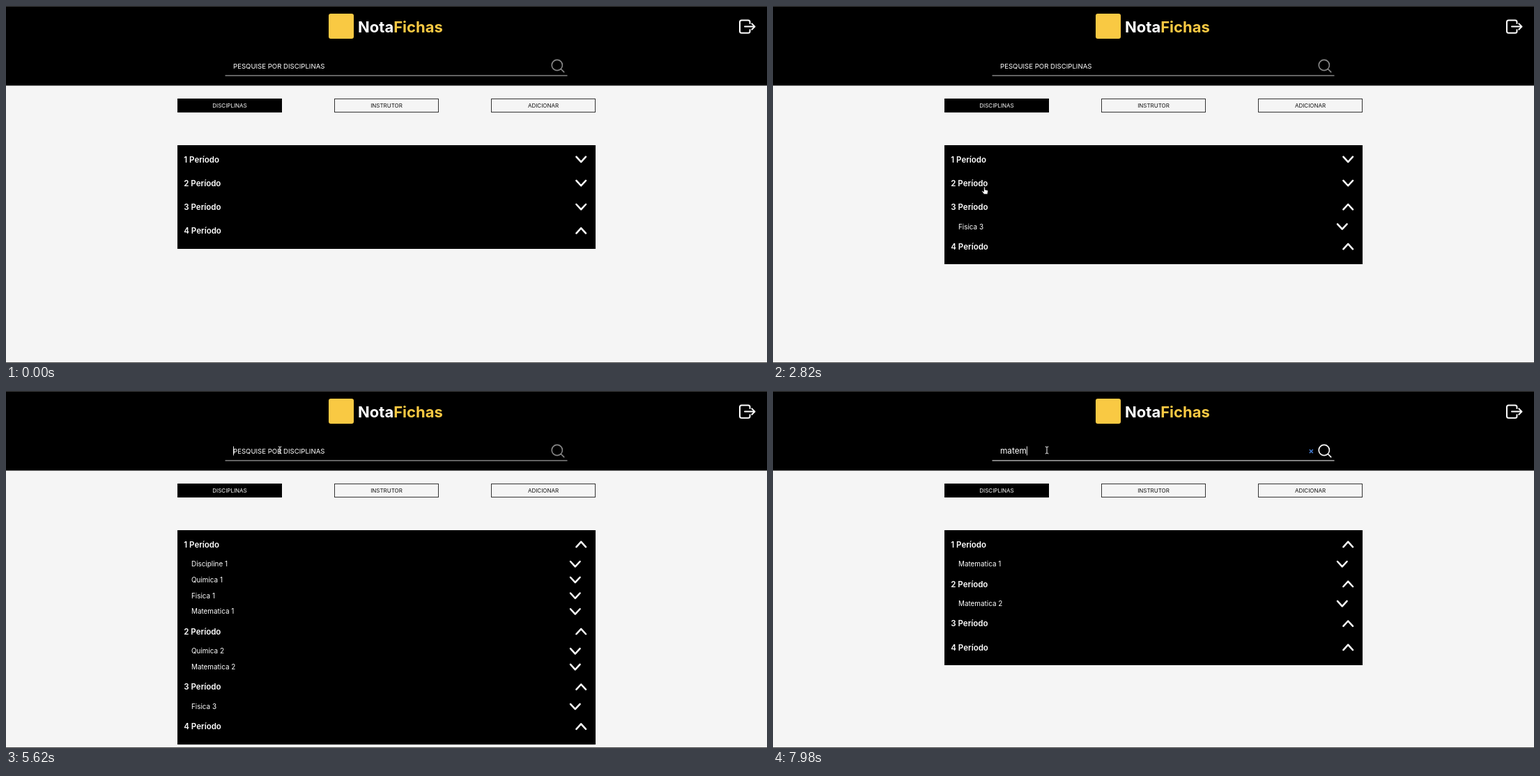
An HTML page that plays this animation: 1092x513 px, repeating every 8 s.

```html
<!DOCTYPE html>
<html lang="pt">
<head>
<meta charset="utf-8">
<title>NotaFichas</title>
<style>
html, body { margin: 0; width: 100%; height: 100%; overflow: hidden; background: #f5f5f5; }
svg { display: block; width: 100vw; height: 100vh; font-family: Inter, "Open Sans", sans-serif; fill: #fff; }
.brand { font-size: 22px; font-weight: 700; }
.tab { font-size: 8px; text-anchor: middle; }
.hint { font-size: 9.6px; }
.typed { font-size: 11.8px; }
.period { font-size: 11.5px; font-weight: 600; }
.item { font-size: 9.9px; }
.line { fill: none; stroke: #fff; stroke-width: 2; stroke-linecap: round; stroke-linejoin: round; }
.chevron { stroke-width: 2.5; }
.cursor { stroke: #000; stroke-width: .7; stroke-linejoin: round; }
</style>
</head>
<body>
<svg id="stage" viewBox="0 0 1092 513" preserveAspectRatio="none">
  <rect width="1092" height="513" fill="#f5f5f5"/>
  <rect width="1092" height="114.4" fill="#000"/>
  <rect width="1092" height="1" fill="#383838"/>
  <rect y="512" width="1092" height="1" fill="#4a4a4a"/>

  <rect x="463" y="11" width="36" height="36" rx="3" fill="#f9c943"/>
  <text class="brand" x="505" y="38">Nota<tspan fill="#f9c943">Fichas</tspan></text>

  <g class="line">
    <path d="M1067.5 25V23a2.5 2.5 0 0 0-2.5-2.5h-9.5a2.5 2.5 0 0 0-2.5 2.5v13.3a2.5 2.5 0 0 0 2.5 2.5h9.5a2.5 2.5 0 0 0 2.5-2.5v-2"/>
    <path d="M1060 29.6h14.3M1070.3 25.4l4.2 4.2-4.2 4.2"/>
  </g>

  <rect id="rule" x="314.5" y="99.5" width="491" height="1"/>
  <text class="hint" id="hint" x="326" y="89.6">PESQUISE POR DISCIPLINAS</text>
  <text class="typed" id="typed" x="326" y="90.2"></text>
  <rect id="caret" y="79.5" width=".9" height="13"/>
  <path id="clear" d="M769.8 84.1l5 5m0-5l-5 5" fill="none" stroke="#3f74c4" stroke-width="1.5"/>
  <path id="lens" class="line" style="stroke-width:1.6" d="M783.2 85a7.6 7.6 0 1 0 15.2 0a7.6 7.6 0 1 0-15.2 0M796.3 90.5l4.4 4.4"/>

  <g id="tabs"></g>
  <g id="panel"></g>

  <g id="pointer">
    <path class="cursor" id="arrow" d="M0 0v10.2l2.4-2.2 1.6 3.6 1.6-.7-1.6-3.5h3.2z"/>
    <path class="cursor" id="hand" d="M-1 .8q.9-1.4 1.8 0v3.2l3.3.8q1 .3.9 1.4l-.7 4.2h-5l-3-3.8q-.3-1.2.9-.9l1.8 1.1z"/>
    <path id="beam" fill="none" stroke="#fff" stroke-width="1" d="M-2.3-5q2 0 2.3 1q.3-1 2.3-1M0-4v8M-2.3 5q2 0 2.3-1q.3 1 2.3 1"/>
  </g>
</svg>
<script>
const LOOP = 8000;
const NS = "http://www.w3.org/2000/svg";
const $ = id => document.getElementById(id);

const periods = [
  ["Discipline 1", "Quimica 1", "Fisica 1", "Matematica 1"],
  ["Quimica 2", "Matematica 2"],
  ["Fisica 3"],
  []
];
// Moment each period is opened, and each key is pressed
const openAt = [3740, 3360, 2520, 0];
const focusAt = 5120;
const keys = [[6700, "m"], [6820, "ma"], [7140, "mat"], [7440, "mate"], [7740, "matem"]];
// time, x, y of the pointer tip
const path = [
  [640, -12, 340], [840, 16, 336], [1200, 190, 324], [1560, 320, 316],
  [2080, 320, 316], [2420, 311, 287], [2560, 311, 287], [2820, 303.5, 260],
  [3000, 303, 256], [3400, 303, 256], [3640, 307, 219], [3800, 307, 219],
  [4060, 316, 194], [4240, 318, 190], [4860, 393, 85], [LOOP, 393, 85]
];

function add(parent, tag, attrs, text) {
  const el = document.createElementNS(NS, tag);
  for (const name in attrs) el.setAttribute(name, attrs[name]);
  if (text) el.textContent = text;
  parent.append(el);
}

function chevron(x, y, up) {
  const h = up ? -3.7 : 3.7;
  add($("panel"), "path", { class: "line chevron", d: `M${x - 6.8} ${y - h}L${x} ${y + h}L${x + 6.8} ${y - h}` });
}

function drawTabs() {
  ["DISCIPLINAS", "INSTRUTOR", "ADICIONAR"].forEach((label, i) => {
    const x = 246 + 225 * i;
    add($("tabs"), "rect", { x: x + .5, y: 133.5, width: 149, height: 19, fill: i ? "#f5f5f5" : "#000", stroke: i ? "#333" : "#000" });
    add($("tabs"), "text", { class: "tab", x: x + 75, y: 146, fill: i ? "#111" : "#fff" }, label);
  });
}

function drawPanel(open, query) {
  const panel = $("panel");
  const lists = periods.map((list, i) =>
    open[i] ? list.filter(name => name.toLowerCase().includes(query)) : []);
  const count = lists.flat().length;
  panel.textContent = "";
  add(panel, "rect", { x: 246, y: 200, width: 600, height: Math.round(148.6 + 22.75 * count), fill: "#000" });
  let y = 220.4;
  lists.forEach((list, i) => {
    add(panel, "text", { class: "period", x: 255.3, y: y + 4.2 }, `${i + 1} Período`);
    chevron(825.2, y, open[i]);
    list.forEach((name, j) => {
      const row = y + 28.3 + 22.75 * j;
      add(panel, "text", { class: "item", x: 266, y: row + 3.5 }, name);
      chevron(816.8, row, false);
    });
    y += 34.15 + 22.75 * list.length;
  });
}

function show(id, on) {
  $(id).style.display = on ? "" : "none";
}

function drawField(query) {
  const filled = query !== "";
  $("typed").textContent = query;
  show("hint", !filled);
  show("clear", filled);
  $("lens").style.stroke = filled ? "#fff" : "#888";
  $("rule").style.fill = filled ? "#fff" : "#c4c4c4";
  $("caret").setAttribute("x", 326 + (filled ? $("typed").getComputedTextLength() : 0));
}

function drawPointer(t) {
  show("pointer", t >= path[0][0]);
  let i = 1;
  while (i < path.length - 1 && path[i][0] < t) i++;
  const [t0, x0, y0] = path[i - 1], [t1, x1, y1] = path[i];
  const k = Math.min(1, Math.max(0, (t - t0) / (t1 - t0)));
  const x = x0 + (x1 - x0) * k, y = y0 + (y1 - y0) * k;
  const onTab = y > 133 && y < 153;
  const kind = y < 100 ? "beam" : x > 246 && (y > 191 || onTab) ? "hand" : "arrow";
  for (const id of ["arrow", "hand", "beam"]) show(id, id === kind);
  $("pointer").setAttribute("transform", `translate(${x} ${y})`);
}

let last = "";
function render(t) {
  const open = openAt.map(start => t >= start);
  const pressed = keys.filter(key => t >= key[0]).pop();
  const query = pressed ? pressed[1] : "";
  const state = open + query;
  if (state !== last) {
    drawPanel(open, query);
    drawField(query);
    last = state;
  }
  const since = t - (pressed ? pressed[0] : focusAt);
  show("caret", since >= 0 && since % 1060 < 530);
  drawPointer(t);
}

drawTabs();
const start = performance.now();
function tick() {
  render((performance.now() - start) % LOOP);
  requestAnimationFrame(tick);
}
tick();
</script>
</body>
</html>
```
